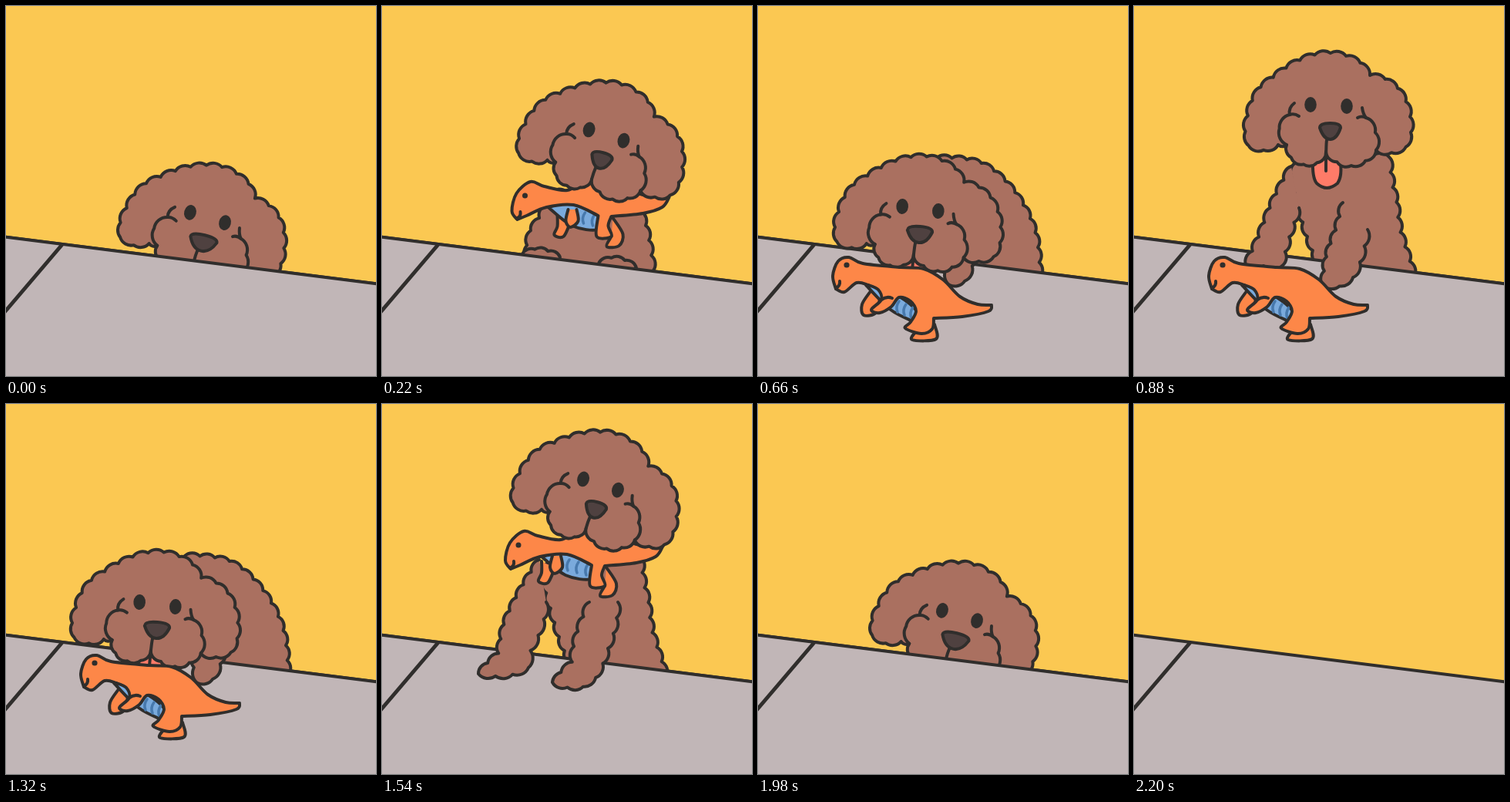
Animation, 480 px wide and 480 px high, one loop 2640 ms. Source, as an HTML page:

```html
<!DOCTYPE html>
<html lang="en">
<head>
<meta charset="utf-8">
<title>Puppy and toy</title>
<style>
html, body { margin: 0; width: 100%; height: 100%; overflow: hidden; background: #fbc852; }
svg { display: block; width: 100vw; height: 100vh; }
svg * { stroke-linecap: round; stroke-linejoin: round; }
path { stroke: #302e2c; stroke-width: 4; fill: none; }
.fur { fill: #aa7060; }
.toy { fill: #fd8748; }
.belly { fill: #7aaadc; }
.stripe { stroke: #4779ad; stroke-width: 3.5; }
.tongue { fill: #fe7b68; }
.nose { fill: #4f4140; }
.dot { fill: #302e2c; }
.top { fill: #c1b6b7; stroke: none; }
.pose { visibility: hidden; animation: 2640ms step-end infinite; }
#peek { animation-name: peek; }
#rise { animation-name: rise; }
#hold { animation-name: hold; }
#drop { animation-name: drop; }
#sit { animation-name: sit; }
#bow { animation-name: bow; }
@keyframes peek { 0%, 75% { visibility: visible; } 8.3333%, 83.3333%, 100% { visibility: hidden; } }
@keyframes rise { 8.3333%, 66.6667% { visibility: visible; } 0%, 16.6667%, 75%, 100% { visibility: hidden; } }
@keyframes hold { 16.6667%, 58.3333% { visibility: visible; } 0%, 25%, 66.6667%, 100% { visibility: hidden; } }
@keyframes drop { 25% { visibility: visible; } 0%, 33.3333%, 100% { visibility: hidden; } }
@keyframes sit { 33.3333% { visibility: visible; } 0%, 50%, 100% { visibility: hidden; } }
@keyframes bow { 50% { visibility: visible; } 0%, 58.3333%, 100% { visibility: hidden; } }
</style>
</head>
<body>
<svg id="stage" viewBox="0 0 480 480"></svg>
<script>
const CURL = 20;
const probe = document.createElementNS('http://www.w3.org/2000/svg', 'path');

const path = (d, cls = '') => `<path class="${cls}" d="${d}"/>`;
const move = (x, y, art, tilt = 0) => `<g transform="translate(${x} ${y}) rotate(${tilt})">${art}</g>`;

// Smooth cubic segments through the key points
const spline = pts => pts.slice(1).map((c, i) => {
  const b = pts[i], a = pts[i - 1] || b, e = pts[i + 2] || c;
  const lead = k => b[k] + (c[k] - a[k]) / 6;
  const tail = k => c[k] - (e[k] - b[k]) / 6;
  return `C${lead(0)} ${lead(1)} ${tail(0)} ${tail(1)} ${c}`;
}).join('');

// Even curls along the same spline
function ruffle(pts) {
  probe.setAttribute('d', `M${pts[0]}` + spline(pts));
  const len = probe.getTotalLength();
  const n = Math.max(1, Math.round(len / CURL));
  const r = len / n * 0.72;
  let d = '';
  for (let i = 1; i <= n; i++) {
    const p = probe.getPointAtLength(len * i / n);
    d += `A${r} ${r} 0 0 1 ${p.x} ${p.y}`;
  }
  return d;
}

// Key points make one run; "|" starts a new run at a corner
function trace(text, draw, cls) {
  let last = [];
  const runs = text.split('|').map(run => {
    const pts = [...last, ...run.trim().split(' ').map(p => p.split(',').map(Number))];
    last = pts.slice(-1);
    return pts;
  });
  return path(`M${runs[0][0]}` + runs.map(draw).join(''), cls);
}
const fur = text => trace(text, ruffle, 'fur');
const crease = text => trace(text, ruffle, '');
const smooth = (text, cls) => trace(text, spline, cls);

const dot = (x, y, rx, ry = rx) => `<ellipse class="dot" cx="${x}" cy="${y}" rx="${rx}" ry="${ry}"/>`;

const stripes = (x, y, dx, dy) => [0, 1, 2].map(i =>
  path(`M${x + i * dx} ${y + i * dy}q-5 7 -2 14`, 'stripe')).join('');

const table = path('M0 299L480 360V480H0Z', 'top') + path('M-4 299.2L484 360.7') +
  '<path d="M72 310.5L-3 398.5" style="stroke-width:5"/>';

const tongue = path('M232 198Q231 223 237 230Q250 242 264 230Q271 220 267 198L249 183Z', 'tongue');

// (x, y) is the point between the eyes
const head = (x, y, tilt, snout = 1, mouth = '') => move(x, y, move(-252.5, -129,
  mouth +
  fur('187,180 170,187 145,178 146,155 151,130 163,107 186,89 212,72 250,61 288,70 306,90 | ' +
    '334,99 353,125 359,155 355,180 336,190 314,187 | 306,196 290,206 268,205 249,189 | ' +
    '233,206 211,202 199,190 198,180 | 187,180') +
  crease('198,180 189,166 191,151 202,141') + path('M208 126Q200 132 202 141Q208 139 214 143') +
  path('M296 132Q297 140 301 145Q295 142 290 145') + crease('301,145 312,160 314,187') +
  path(`M250 174Q249 180 249 ${mouth ? 214 : 189}`) + dot(229, 128, 7.8, 10) + dot(276, 130, 7.8, 10) +
  move(254.5, 162, path(`M${-13.5 * snout} -4q0 -6 ${13.5 * snout} -6t${13.5 * snout} 6` +
    `q${-5 * snout} 15 ${-13.5 * snout} 15t${-13.5 * snout} -15Z`, 'nose'))), tilt);

const torso = fur('239,335 224,296 214,262 | 205,212 240,190 331,196 | 334,228 342,262 344,288 364,350');

// Toy in the mouth; the front legs swing by (dx, dy)
const carryToy = (dx, dy) =>
  move(dx, dy, smooth('207,204 207,219 203,230 215,232 224,213', 'toy')) +
  smooth('291,212 304,233 299,248 283,249 289,236', 'toy') +
  smooth('207,198 238,192 272,209 | 271,227 238,222 207,198', 'belly') +
  stripes(243, 202, 12, 3) +
  smooth('167,214 160,203 166,180 184,165 202,171 232,176 264,164 330,182 364,185 | ' +
    '355,198 330,206 289,210 | 285,222 289,236 270,236 272,209 | 240,195 205,198 179,209 167,214', 'toy') +
  move(dx, dy, smooth('221,197 218,212 224,220 234,212 232,197', 'toy')) +
  dot(177, 183, 3.5) + path('M167 212Q172 210 171 204');

const floorToy =
  smooth('146,370 135,387 137,401 153,398 158,380', 'toy') +
  smooth('205,422 200,433 231,432 229,413', 'toy') +
  smooth('140,362 172,394 203,410 | 206,396 182,376 150,362', 'belly') +
  stripes(183, 383, 9, 4) +
  smooth('101,367 97,350 104,331 118,326 136,334 185,339 215,341 240,355 262,377 285,387 303,388 | ' +
    '299,396 265,403 228,405 | 226,419 212,425 191,418 198,410 205,396 198,383 183,378 ' +
    '173,390 158,398 147,394 160,381 156,368 143,362 128,359 112,371 101,367', 'toy') +
  path('M160 381Q167 376 174 379') + dot(115, 336, 3.6) + path('M101 366Q107 363 106 357');

const peek = head(261.5, 274.5, 14, 1.3) + table;

const rise =
  fur('188,330 190,298 206,272 222,240 | 328,262 343,290 352,343') +
  fur('182,322 205,315 231,326') + fur('281,334 305,326 330,340') +
  table + move(8.5, 63, carryToy(12, 4)) + head(291, 167.5, 15);

const hold =
  move(5, 3, torso) + table +
  fur('213,257 207,290 193,318 190,342 | 160,353 125,350 | 130,341 151,324 157,290 177,246 204,202') +
  fur('306,257 302,290 290,325 282,347 268,364 244,368 221,361 | 222,353 245,339 251,305 269,257') +
  carryToy(0, 0) + head(283.5, 104.5, 15);

const sit =
  torso + table +
  fur('214,262 201,300 191,338 | 145,336 | 162,300 180,254 204,208') +
  fur('303,290 293,332 276,361 245,362 | 250,325 264,285 271,255') +
  head(252.5, 129, 0, 1, tongue) + floorToy;

const bow = (x, y) =>
  fur('250,355 232,197 | 258,198 292,205 324,231 347,264 361,300 366,352') + table +
  fur('283,316 275,345 262,362 245,358 245,320') + head(x, y, 5, 1.2, tongue) + floorToy;

const poses = { peek, rise, hold, drop: bow(210.5, 263), sit, bow: bow(196.5, 260) };
document.getElementById('stage').innerHTML =
  '<rect width="480" height="480" fill="#fbc852"/>' + table +
  Object.entries(poses).map(([id, art]) => `<g class="pose" id="${id}">${art}</g>`).join('');
</script>
</body>
</html>
```
